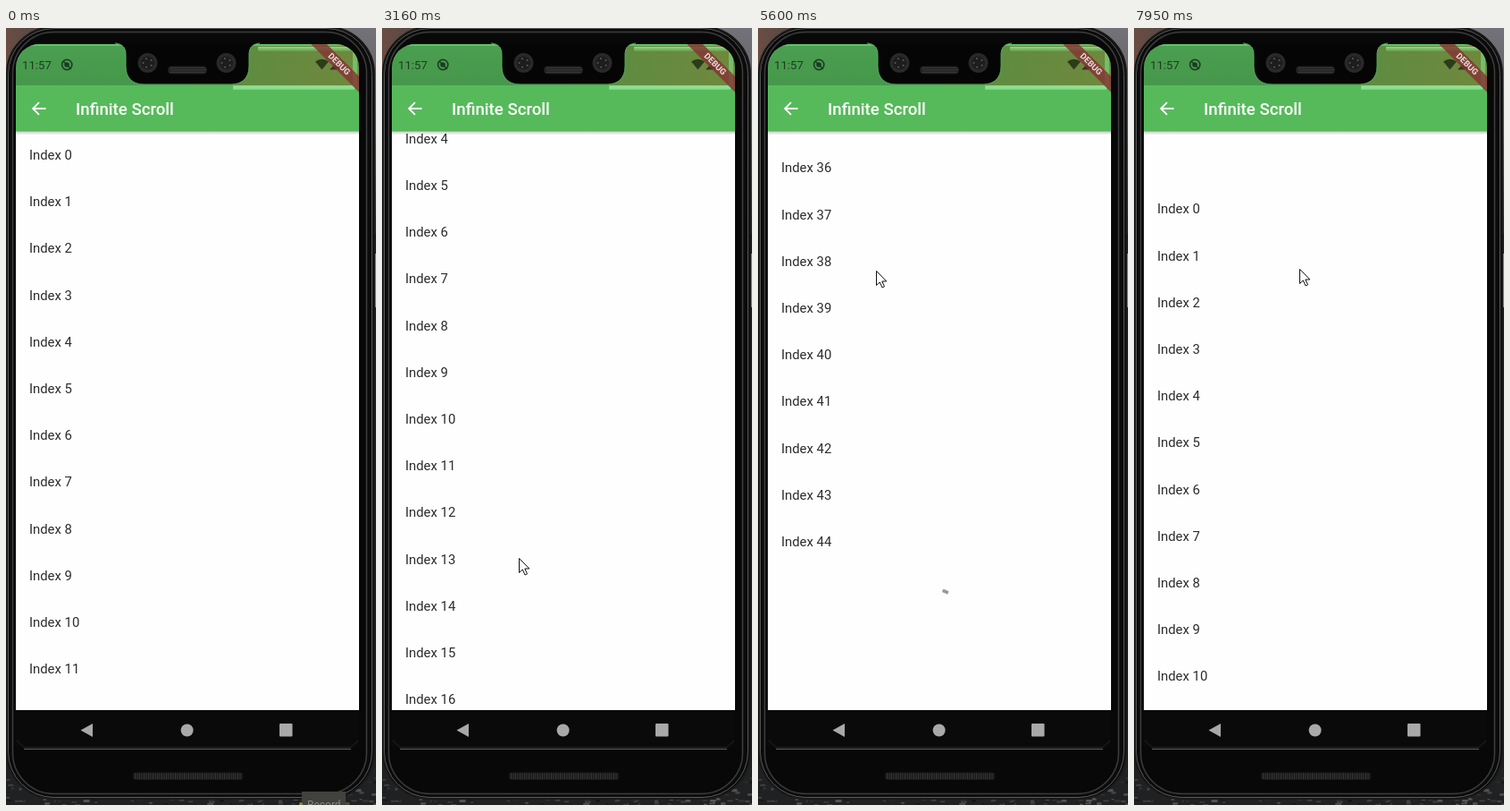
Recreate the animation shown at these times as an HTML page with a canvas. Size 414 by 868 pixels, loop 8 s.

```html
<!DOCTYPE html>
<html lang="en">
<head>
<meta charset="utf-8">
<title>Infinite Scroll</title>
<style>
  html, body { margin: 0; width: 100%; height: 100%; overflow: hidden; background: #141414; }
  canvas { display: block; width: 414px; height: 868px; }
</style>
</head>
<body>
<canvas id="stage" width="414" height="868"></canvas>
<script>
const W = 414, H = 868, LOOP = 8000, TICK = 69.1, LAG = 20;
const ctx = document.getElementById('stage').getContext('2d');
const FONT = 'Roboto, sans-serif';
const ROW = 52.19, FIRST = 142, LOADER = 90, PAGE = 15;
const LEFT = 11, RIGHT = 395, TOP = 18, BAR_TOP = 64, BAR_BOTTOM = 115.6, NAV = 762;
const INK = '#1d3d20';

const LOAD_TIME = 1113;   // loader on screen before the next page arrives
const BOUNCE = 80;        // time to the peak of the overscroll
const ENTER = 250, LINGER = 100, GLIDE = 1100;
const DOOR = [343, 870];

// End of the list with n pages loaded.
const endOf = n => 227 + (n - 1) * PAGE * ROW;

// Each swipe runs from start to hit, then overshoots its goal and springs back.
const SWIPES = [
  { start: 1815, hit: 1885, goal: endOf(1), over: 17, spin: 1627, press: [221, 600], lift: [221, 353] },
  { start: 3580, hit: 3820, goal: endOf(2), over: 11.2, spin: 3631, press: [153, 592], lift: [134, 422] },
  { start: 5390, hit: 5517, goal: endOf(3), over: 74.5, spin: 5497, press: [145, 600], lift: [132, 271] },
  { start: 7200, hit: 7866, goal: 0, over: -62.5, press: [202, 290], lift: [185, 269] }
];
const LOADERS = SWIPES.filter(s => s.spin).map(s => s.spin);

const smooth = u => u * u * (3 - 2 * u);
const easeOut = u => 1 - (1 - u) * (1 - u);
const mix = (a, b, u) => a + (b - a) * u;
const span = (t, a, b) => Math.min(1, Math.max(0, (t - a) / (b - a)));

function scrollAt(t) {
  let offset = 0;
  for (const s of SWIPES) {
    if (t < s.start) break;
    const x = Math.max(0, t - s.hit) / BOUNCE;
    offset = mix(t < s.hit ? offset : s.goal, s.goal, easeOut(span(t, s.start, s.hit)));
    offset += s.over * x * Math.exp(1 - x);
    if (t > s.hit + 12 * BOUNCE) offset = s.goal;
  }
  return offset;
}

function pointerAt(t) {
  let from = DOOR, leave = ENTER, pos = DOOR;
  for (const s of SWIPES) {
    if (t < leave) break;
    const glide = smooth(span(t, leave, leave + GLIDE));
    const drag = smooth(span(t, s.start, s.hit));
    pos = from.map((v, i) => mix(mix(v, s.press[i], glide), s.lift[i], drag));
    from = s.lift;
    leave = s.hit + LINGER;
  }
  return pos;
}

// cubic-bezier(.4, 0, .2, 1)
function fastOutSlowIn(x) {
  if (x <= 0) return 0;
  if (x >= 1) return 1;
  let lo = 0, hi = 1, s = 0.5;
  for (let i = 0; i < 20; i++) {
    s = (lo + hi) / 2;
    const bx = 1.2 * s * (1 - s) * (1 - s) + 0.6 * s * s * (1 - s) + s * s * s;
    if (bx < x) lo = s; else hi = s;
  }
  return smooth(s);
}

function seeded(seed) {
  return () => (seed = seed * 16807 % 2147483647) / 2147483647;
}

function rect(x, y, w, h, color) {
  ctx.fillStyle = color;
  ctx.fillRect(x, y, w, h);
}

function round(x, y, w, h, r, fill, stroke, line = 1) {
  ctx.beginPath();
  ctx.roundRect(x, y, w, h, r);
  if (fill) { ctx.fillStyle = fill; ctx.fill(); }
  if (stroke) { ctx.strokeStyle = stroke; ctx.lineWidth = line; ctx.stroke(); }
}

function arc(x, y, r, a, b, color, line) {
  ctx.beginPath();
  ctx.arc(x, y, r, a, b);
  ctx.strokeStyle = color;
  ctx.lineWidth = line;
  ctx.stroke();
}

function disc(x, y, r, color) {
  ctx.beginPath();
  ctx.arc(x, y, r, 0, Math.PI * 2);
  ctx.fillStyle = color;
  ctx.fill();
}

function shape(d, fill, stroke, line = 1) {
  const p = new Path2D(d);
  if (fill) { ctx.fillStyle = fill; ctx.fill(p); }
  if (stroke) { ctx.strokeStyle = stroke; ctx.lineWidth = line; ctx.stroke(p); }
}

function text(s, x, y, size, color, weight = 400) {
  ctx.font = `${weight} ${size}px ${FONT}`;
  ctx.fillStyle = color;
  ctx.fillText(s, x, y);
}

function fade(x0, y0, x1, y1, ...colors) {
  const g = ctx.createLinearGradient(x0, y0, x1, y1);
  colors.forEach((c, i) => g.addColorStop(i / (colors.length - 1), c));
  return g;
}

function clipScreen() {
  ctx.save();
  ctx.beginPath();
  ctx.roundRect(LEFT, TOP, RIGHT - LEFT, 100, [26, 26, 0, 0]);
  ctx.clip();
}

function drawBody() {
  rect(0, 0, W, H, '#202122');
  rect(0, 0, 60, 60, fade(0, 0, 50, 0, '#6b4d42', '#4a4848'));
  rect(350, 0, 64, 230, fade(0, 0, 0, 230, '#737278', '#5c5c60', '#2d2d2f'));
  rect(411, 252, 3, 60, '#8c8c8c');
  const rnd = seeded(7);
  for (let i = 0; i < 260; i++) {
    const v = 20 + rnd() * 70 | 0;
    rect(rnd() * W, 835 + rnd() * 33, 2 + rnd() * 5, 1 + rnd() * 2, `rgb(${v},${v},${v})`);
  }
  round(1, -1, 411, 862, 52, '#0b0b0b', '#191919', 2);
  round(2.5, 0.5, 407, 859, 51, null, '#5c5c5c');
  round(7.5, 4.5, 396, 851, 46, null, '#3c3c3c', 1.5);
  round(9, 7, 393, 846, 42, '#080808');
}

function drawList(t) {
  const offset = scrollAt(t);
  const loaded = LOADERS.filter(v => t >= v + LOAD_TIME).length;
  const count = PAGE * (1 + loaded);
  ctx.save();
  ctx.beginPath();
  ctx.rect(LEFT, 114, RIGHT - LEFT, NAV - 114);
  ctx.clip();
  rect(LEFT, 114, RIGHT - LEFT, NAV - 114, '#fefefe');
  for (let i = 0; i < count; i++) {
    const y = FIRST + i * ROW - offset;
    if (y > 95 && y < 780) text('Index ' + i, 25.9, y + 5.1, 14.9, '#2c2c2c');
  }
  const y = FIRST + (count - 0.5) * ROW + LOADER / 2 - offset;
  if (t >= LOADERS[loaded]) drawSpinner(203, y, t - LOADERS[loaded]);
  ctx.restore();
}

function drawSpinner(x, y, age) {
  const phase = age / 1333 % 1;
  const head = fastOutSlowIn(phase * 2), tail = fastOutSlowIn(phase * 2 - 1);
  const start = Math.PI * (-0.5 + tail * 1.5 + age / 2222 * 2 + phase * 0.5);
  const sweep = Math.max((head - tail) * 1.5 * Math.PI, 0.001);
  ctx.lineCap = 'square';
  arc(x, y, 16.8, start, start + sweep, age < 110 ? '#999' : '#339df5', 3.7);
  ctx.lineCap = 'butt';
}

function drawStatus() {
  clipScreen();
  rect(LEFT, TOP, 200, 46, fade(0, TOP, 0, 64, '#4b9f50', '#46974b'));
  rect(210, TOP, 185, 46, fade(270, 0, RIGHT, 0, '#5f8c41', '#70883d'));
  rect(LEFT, TOP, RIGHT - LEFT, 2, '#62c168');
  rect(282, 21, 106, 5, fade(0, 21, 0, 26, '#8edb88', '#6a9a4a'));
  rect(388, 22, 5, 42, '#74bd69');
  ctx.restore();

  const notch = 'M122 17C131 18 134 22 134 30V43C134 56 142 63 154 63H252C264 63 272 56 272 43V30C272 22 275 18 284 17';
  shape(notch + 'Z', '#050505', null);
  shape(notch, null, '#57b05c');

  for (const x of [158.5, 246.5]) {
    disc(x, 39, 11, '#292929');
    disc(x, 39, 7.5, '#1d1d1d');
    for (let a = 0.6; a < 6; a += 1.26) disc(x + 5 * Math.cos(a), 39 + 5 * Math.sin(a), 1, '#5c5c5c');
  }
  round(181, 42.5, 44, 9, 4.5, '#202020');
  for (let i = 0; i < 60; i++) disc(184 + (i % 20) * 2 + (i / 20 & 1), 44.5 + (i / 20 | 0) * 2.4, 0.6, '#565656');

  text('11:57', 18, 46, 13.2, INK);
  arc(68.2, 41, 5.6, 0, Math.PI * 2, INK, 1.6);
  disc(68, 41, 2.8, INK);
  shape('M64 37L73 46', null, INK, 1.4);
  shape('M346 37.5Q353.5 32 361 37.5L353.5 46.5Z', '#2c3b1c');
  shape('M362 46.5L373 35.5V46.5Z', '#3b3421');
}

function drawBar() {
  rect(LEFT, BAR_TOP, RIGHT - LEFT, BAR_BOTTOM - BAR_TOP, '#56ba5b');
  rect(254, 63, 136, 6, fade(0, 63, 0, 69, '#6fca73', '#93e195', '#7bd57f'));
  rect(LEFT, BAR_BOTTOM, RIGHT - LEFT, 4, fade(0, BAR_BOTTOM, 0, BAR_BOTTOM + 4, 'rgba(0,0,0,.2)', 'rgba(0,0,0,0)'));
  shape('M44.5 90H31M37 83.2L30.2 90L37 96.8', null, '#fff', 1.9);
  text('Infinite Scroll', 78, 96.6, 18.65, '#fff', 500);
}

function drawBanner() {
  clipScreen();
  ctx.translate(RIGHT, TOP);
  ctx.rotate(Math.PI / 4);
  rect(-42, 25.5, 84, 12.5, 'rgba(132,50,50,.8)');
  ctx.textAlign = 'center';
  text('DEBUG', 0, 34.6, 9.5, '#e9dcdc', 700);
  ctx.restore();
}

function drawNav() {
  rect(LEFT, NAV, RIGHT - LEFT, 41, '#0a0a0a');
  shape('M97 777V792L83.5 784.5Z', '#a8a8a8');
  disc(202.6, 784.5, 7, '#a8a8a8');
  round(306, 777, 14.5, 14.5, 1, '#a8a8a8');
  shape('M12 796L20 803.5H386L394 796', null, '#262626');
  shape('M20 805.5H386', null, '#626262');
  round(142, 831.5, 123, 8.5, 3, '#1b1b1b');
  for (let x = 144; x < 264; x += 2.5) rect(x, 832.5, 1, 6.5, '#353535');
}

function drawRecord() {
  rect(331, 853, 49, 15, '#41423e');
  disc(330, 867, 2, '#8a8246');
  text('Record', 337, 871.5, 12, '#85857e');
}

function drawPointer(t) {
  const [x, y] = pointerAt(t);
  ctx.save();
  ctx.translate(x + 0.5, y + 0.5);
  shape('M0 0V16L3.8 12.5L6.5 18.5L9 17.3L6.3 11.5H11.3Z', '#fff', '#111');
  ctx.restore();
}

function frame(now) {
  const t = Math.floor((now % LOOP + LAG) / TICK) * TICK - LAG;
  drawBody();
  drawList(t);
  drawBar();
  drawStatus();
  drawBanner();
  drawNav();
  if (t < TICK / 2) drawRecord();
  if (t >= ENTER) drawPointer(t);
  requestAnimationFrame(frame);
}
requestAnimationFrame(frame);
</script>
</body>
</html>
```
